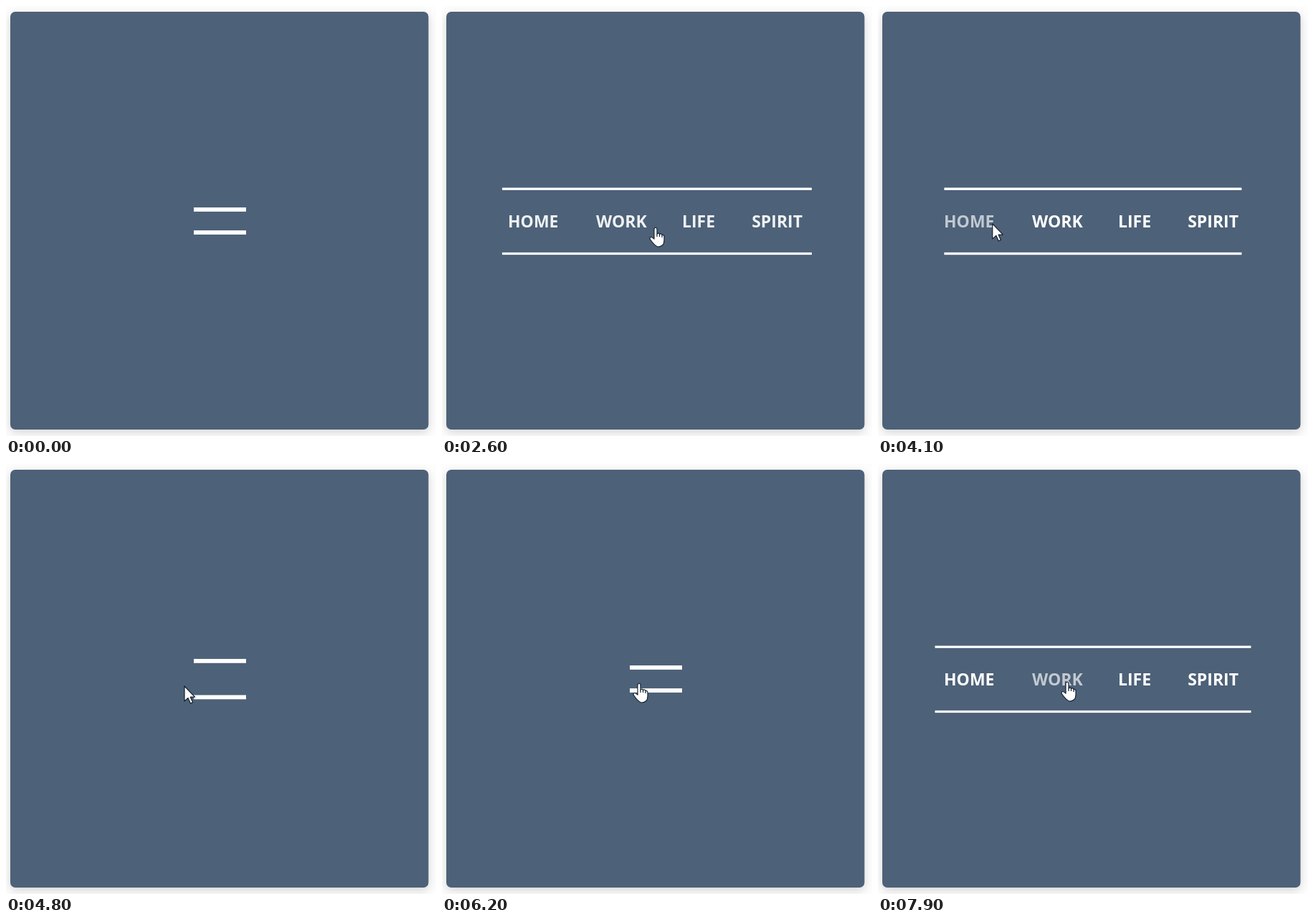
These frames come from a looping animation (600x600 px, 8000 ms). An HTML page with a canvas:

```html
<!DOCTYPE html>
<html lang="en">
<head>
<meta charset="utf-8">
<title>Menu animation</title>
<style>
html, body { margin: 0; width: 100%; height: 100%; overflow: hidden; background: #fdfdfd; }
canvas { display: block; }
</style>
</head>
<body>
<canvas id="stage" width="600" height="600"></canvas>
<script>
const ctx = document.getElementById('stage').getContext('2d');
const LOOP = 8000, STEP = 100;

const ARROW = new Path2D('M0 0V21L5 16.5L8.5 24L11.6 22.6L8.3 15.2H14.6Z');
const HAND = new Path2D('M-2 2Q0-2 2 2V9Q5 7 5.5 9.5Q8.5 8 9 10.5Q12 10 12 13V18' +
  'Q12 27 3 27Q-1 26-8 16Q-8 11-2 16Z');
const KNUCKLES = new Path2D('M2 9V13M5.5 9V13M9 10V14');

// cubic-bezier(.25, .1, .25, 1)
function ease(x) {
  let lo = 0, hi = 1;
  for (let i = 0; i < 20; i++) {
    const s = (lo + hi) / 2, r = 1 - s;
    if (0.75 * r * s + s * s * s < x) lo = s; else hi = s;
  }
  const r = 1 - lo;
  return 0.3 * r * r * lo + 3 * r * lo * lo + lo * lo * lo;
}

const mix = (a, b, k) => a + (b - a) * k;
const ramp = (t, start, length) => Math.min(1, Math.max(0, (t - start) / length));
const pulse = (t, from, to) => ramp(t, from, 150) - ramp(t, to, 150);

// opened, closed, opened again
function toggle(t, open, close, reopen, length) {
  const eased = start => ease(ramp(t, start, length));
  return eased(open) - eased(close) + eased(reopen);
}

function pointerAt(t) {
  let x = 568, y = 358;
  const move = (from, to, endX, endY, arc = 0) => {
    const k = ramp(t, from, to - from);
    x = mix(x, endX, k);
    y = mix(y, endY, k) - arc * Math.sin(Math.PI * k);
  };
  move(800, 1600, 298, 309, 85);
  move(3000, 3800, 147, 303, 20);
  move(4000, 4800, 249, 310);
  move(4800, 5000, 484, 338);
  move(5000, 5200, 359, 310);
  move(5600, 5900, 223, 300);
  move(5900, 6200, 275, 306);
  move(6400, 7600, 264, 304);
  return [x, y];
}

function drawCard() {
  ctx.fillStyle = '#fdfdfd';
  ctx.fillRect(0, 0, 600, 600);
  ctx.save();
  ctx.shadowColor = 'rgba(0,0,0,.16)';
  ctx.shadowBlur = 13;
  ctx.shadowOffsetY = 4;
  ctx.fillStyle = '#4d6178';
  ctx.beginPath();
  ctx.roundRect(6, 8, 583.5, 583, 7);
  ctx.fill();
  ctx.restore();
}

function drawBars(t) {
  const apart = toggle(t, 1750, 4680, 6550, 300);
  const wide = toggle(t, 2080, 4046, 6830, 650);
  const left = mix(262, 79.5, wide), right = mix(335, 520.5, wide);
  const thick = mix(5.8, 3.2, wide);
  ctx.fillStyle = '#fff';
  for (const y of [mix(284, 255.2, apart), mix(316, 345.5, apart)])
    ctx.fillRect(left, y - thick / 2, right - left, thick);
}

function drawItems(t) {
  const shown = toggle(t, 2310, 4120, 7060, 450);
  const word = (text, x, hover = 0) => {
    ctx.globalAlpha = shown * (1 - 0.34 * hover);
    ctx.fillText(text, x, 309);
  };
  ctx.font = '700 23px "Open Sans", sans-serif';
  ctx.fillStyle = '#fff';
  word('HOME', 92, pulse(t, 3880, 4600));
  word('WORK', 215, pulse(t, 3200, 3480) + pulse(t, 6900, LOOP));
  word('LIFE', 335);
  word('SPIRIT', 432.2);
  ctx.globalAlpha = 1;
}

function drawPointer(t) {
  if (t < 800) return;
  const [x, y] = pointerAt(t);
  const overBars = t >= 5600 && x > 255 && x < 340;
  const hand = (t >= 1450 && t < 4050) || overBars;
  const shape = hand ? HAND : ARROW;
  ctx.save();
  ctx.translate(x, y);
  ctx.fillStyle = '#fff';
  ctx.strokeStyle = '#14202e';
  ctx.lineWidth = 1.2;
  ctx.lineJoin = 'round';
  ctx.fill(shape);
  ctx.stroke(shape);
  if (hand) ctx.stroke(KNUCKLES);
  ctx.restore();
}

let start;
function frame(now) {
  start ??= now - 20;
  const t = Math.floor(((now - start) % LOOP) / STEP) * STEP;
  drawCard();
  drawBars(t);
  drawItems(t);
  drawPointer(t);
  requestAnimationFrame(frame);
}
requestAnimationFrame(frame);
</script>
</body>
</html>
```
